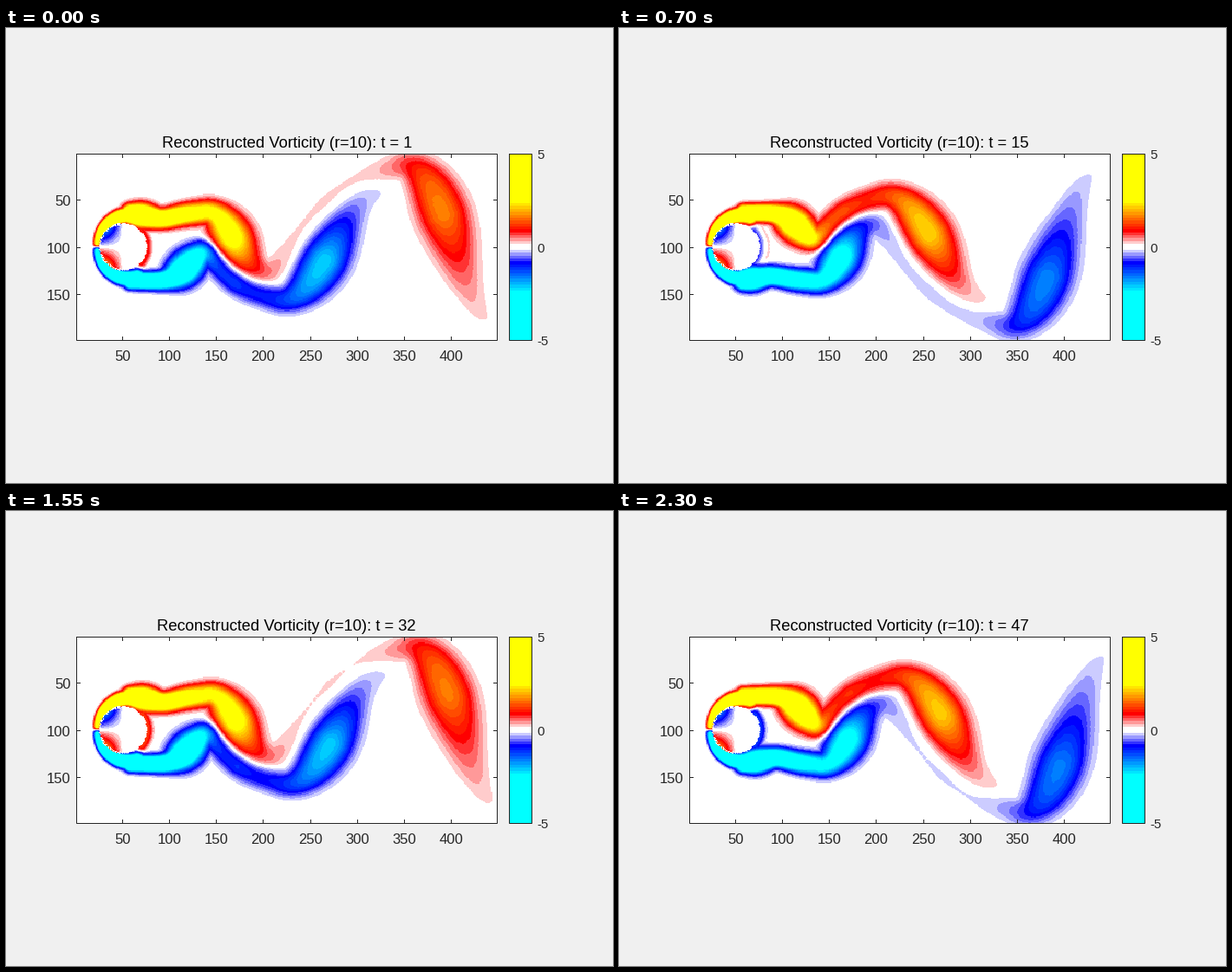
Animation of 700 by 525 pixels, one loop 2.35 s. Source, as a matplotlib script:

```python
import numpy as np
import matplotlib.pyplot as plt
from matplotlib.animation import FuncAnimation
from matplotlib.colors import ListedColormap

W, H, DPI = 700, 525, 100
FRAMES, INTERVAL = 47, 50
PERIOD = 30.3                       # shedding period, in frames
LEFT, RIGHT, TOP, BOTTOM = 81.5, 566.5, 145.5, 360.5
BAR_LEFT, BAR_RIGHT = 580.5, 606.5
NX, NY = 449, 199
CELL_X, CELL_Y = (RIGHT - LEFT) / NX, (BOTTOM - TOP) / NY
CX, CY, R = 134.5, 253, 27          # cylinder
INK = (0.15, 0.15, 0.15)
FONT = "Liberation Sans"

gx = LEFT + (np.arange(NX) + 0.5) * CELL_X
gy = TOP + (np.arange(NY) + 0.5) * CELL_Y


def logistic(t, scale):
    return 1 / (1 + np.exp(-t / scale))


def softplus(t, scale):
    """A smooth ramp: zero before t = 0, slope one after it."""
    return scale * np.logaddexp(0, t / scale)


def stamp(field, x, y, width, peak):
    """Merge one round, flat-topped bump into the field."""
    reach = 1.9 * width
    i0, i1 = np.searchsorted(gx, (x - reach, x + reach))
    j0, j1 = np.searchsorted(gy, (y - reach, y + reach))
    if peak < 0.1 or i0 == i1 or j0 == j1:
        return
    d2 = ((gx[i0:i1] - x) ** 2 + (gy[j0:j1, None] - y) ** 2) / width ** 2
    part = field[j0:j1, i0:i1]
    np.maximum(part, peak * np.exp(-d2 ** 1.25), out=part)


def stroke(field, *columns):
    for point in np.broadcast(*columns):
        stamp(field, *point)


def attached_layer():
    """Thin layer wrapped round the front and top of the cylinder."""
    s = np.linspace(0, 1, 30)
    angle = np.radians(172 - 106 * s)
    r = 30.5 + 9 * s ** 2
    return (CX + r * np.cos(angle), CY - r * np.sin(angle),
            3.5 + 5.5 * s, np.minimum(5, 3 + 6 * s))


def wake(phase):
    """Sheet of shed vorticity, followed by the age of its material."""
    age = np.arange(-29, 52, 0.35)
    phi = 2 * np.pi * (age - phase) / PERIOD
    psi = phi - (0.3 - 0.018 * age)             # zero at a vortex core
    far = 1 - np.cos(psi)

    # the sheet speeds up and its waves grow and steepen
    swing = 2.3 * softplus(age + 10, 7)
    wave = np.sin(phi + 0.6 * np.maximum(0, -np.cos(phi)))
    x = 248.4 + 3.6 * age + 6 * softplus(age - 6.2, 3.5) - 0.16 * swing * np.sin(phi)
    y = 214 + 24 * logistic(age + 9, 6) + swing * wave

    # strength decays and gathers in the cores
    gather = np.minimum(1.4, 0.06 * softplus(age + 3, 5))
    cut = 0.8 * np.maximum(0, np.sin(psi)) * logistic(age + 2, 3)
    peak = 2.9 * np.exp(-age / 52 - gather * far - cut)
    width = 9 + 4.5 * logistic(age + 16, 4) + (8.5 + 0.18 * age) * np.exp(-2.5 * far)
    return x, y, width, peak


def rear_patch(phase):
    """Secondary vorticity hugging the back of the cylinder."""
    swing = 2 * np.pi * (phase - 6) / PERIOD
    angle = np.radians(np.linspace(-40, 40, 14))
    r = 31 + 4 * np.sin(swing)
    power = 1.8 * (0.5 + 0.5 * np.cos(swing)) ** 2
    return CX + r * np.cos(angle), CY + r * np.sin(angle), 6.5, power


def one_sign(time):
    """Vorticity of the upper layer and of the vortices it sheds."""
    phase = time % PERIOD
    field = np.zeros((NY, NX))
    for part in (attached_layer(), wake(phase), rear_patch(phase)):
        stroke(field, *part)
    return field


# ---- Flow inside the cylinder's rim ----
cu = (gx[None, :] - CX) / R
cv = (gy[:, None] - CY) / R
radius = np.hypot(cu, cv)
lobes = 3.2 * cv * np.maximum(-cu, 0)
rear_rim = 2.5 * cv * ((radius > 0.82) & (cu > 0.3))
rng = np.random.default_rng(4)
ragged = (radius > 0.93) & (radius < 1.03) & (rng.random((NY, NX)) < 0.5)


def vorticity(time):
    """The lower side repeats the upper one, mirrored, half a period later."""
    w = one_sign(time) - one_sign(time + PERIOD / 2)[::-1]
    pulse = np.sin(2 * np.pi * (time - 1) / PERIOD) ** 2
    w = np.where(radius < 1, lobes + pulse * rear_rim, w)
    w[ragged] = 0
    return w


def palette():
    """Cyan, blue, white, red, yellow in 64 steps."""
    colours = []
    for i in range(64):
        k = int(abs(i - 31.5))
        pale = max(0, 1 - k / 5)
        glow = max(pale, min(1, max(0, (k - 5) / 10)))
        colours.append((1, glow, pale) if i > 31 else (pale, glow, 1))
    return ListedColormap(colours)


# ---- Stage ----
fig = plt.figure(figsize=(W / DPI, H / DPI), dpi=DPI, facecolor=(0.94,) * 3)
ax = fig.add_axes([0, 0, 1, 1])
ax.axis("off")
fields = [vorticity(n + 1) for n in range(FRAMES)]
style = dict(cmap=palette(), vmin=-5, vmax=5, interpolation="nearest", aspect="auto")
image = ax.imshow(fields[0], extent=(LEFT, RIGHT, BOTTOM, TOP), **style)
ax.imshow(np.linspace(4.92, -4.92, 64)[:, None],
          extent=(BAR_LEFT, BAR_RIGHT, BOTTOM, TOP), **style)
ax.set_xlim(0, W)
ax.set_ylim(H, 0)


def line(xs, ys):
    ax.plot(xs, ys, color=INK, lw=72 / DPI, solid_capstyle="projecting",
            solid_joinstyle="miter", snap=False)


def box(x0, x1):
    line([x0, x1, x1, x0, x0], [TOP, TOP, BOTTOM, BOTTOM, TOP])


def label(x, y, text, px, ha, color=INK):
    return ax.text(x, y, text, fontsize=px * 72 / DPI, family=FONT, ha=ha,
                   va="baseline", color=color)


box(LEFT, RIGHT)
box(BAR_LEFT, BAR_RIGHT)
for value in range(50, 401, 50):
    x = int(LEFT + (value - 0.5) * CELL_X) + 0.5
    line([x, x], [BOTTOM, BOTTOM - 4])
    line([x, x], [TOP, TOP + 4])
    label(x, 384.5, str(value), 16.67, "center")
for value in (50, 100, 150):
    y = int(TOP + (value - 0.5) * CELL_Y) + 0.5
    line([LEFT, LEFT + 4], [y, y])
    line([RIGHT, RIGHT - 4], [y, y])
    label(74.5, y + 6.5, str(value), 16.67, "right")
for value in (5, 0, -5):
    label(612.5, CY - value * 21.5 + 5.8, str(value), 15, "left")
title = label(323.7, 138, "", 18.33, "center", "black")


def update(n):
    image.set_data(fields[n])
    title.set_text(f"Reconstructed Vorticity (r=10): t = {n + 1}")
    return image, title


anim = FuncAnimation(fig, update, frames=FRAMES, interval=INTERVAL,
                     init_func=lambda: update(0), repeat=True, repeat_delay=0)
plt.show()
```
